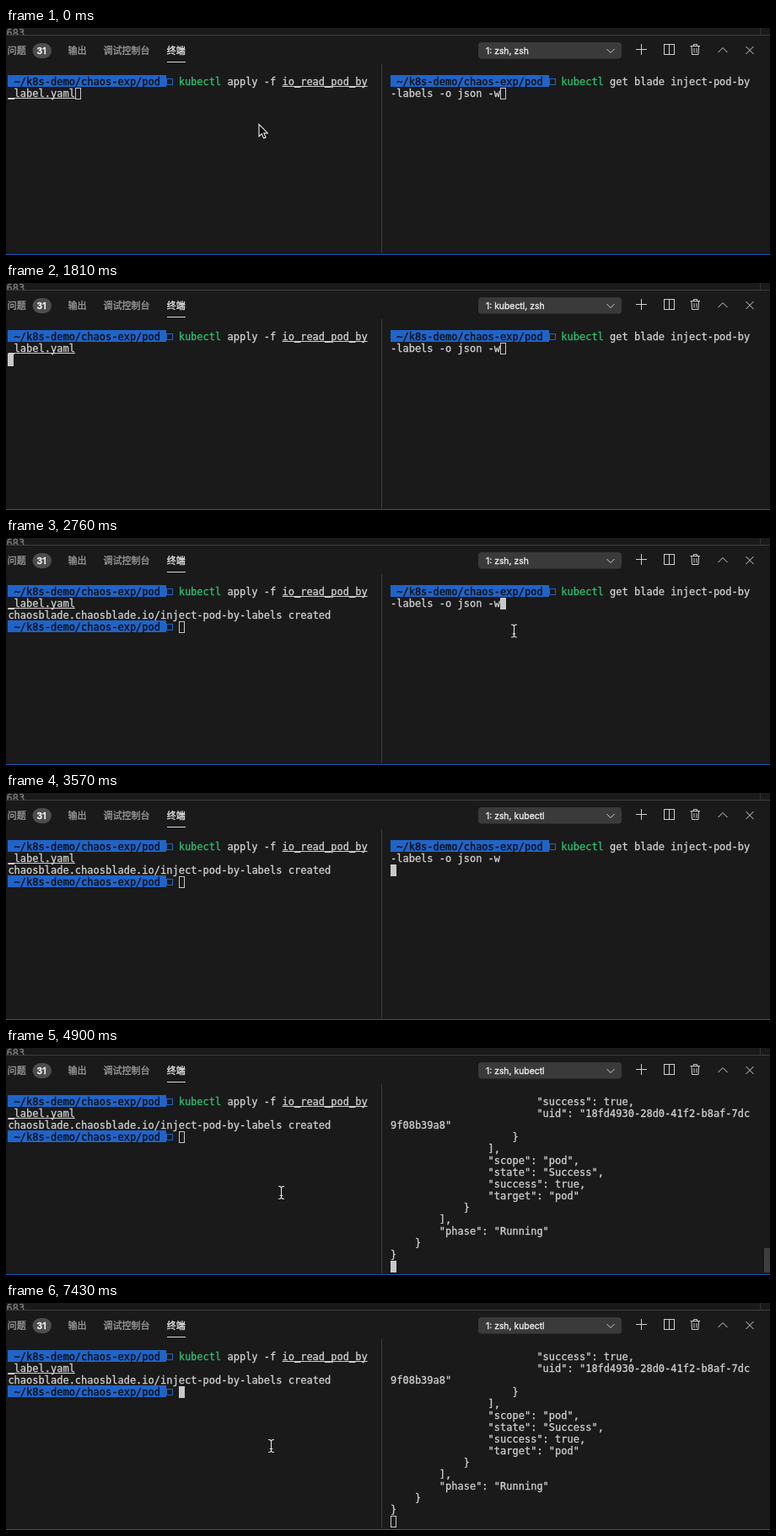
Write an HTML page with a canvas that moves like this. It is 906x270 px and loops after 8 s.

```html
<!DOCTYPE html>
<html lang="zh">
<head>
<meta charset="utf-8">
<title>Terminal</title>
<style>
  html, body { margin: 0; width: 100%; height: 100%; overflow: hidden; background: #1a1a1a; }
  canvas { display: block; width: 906px; height: 270px; }
</style>
</head>
<body>
<canvas id="stage" width="906" height="270"></canvas>
<script>
const ctx = document.getElementById('stage').getContext('2d');
const LOOP = 8000;
const MONO = '12px "DejaVu Sans Mono", monospace';
const CJK = '11px "Noto Sans CJK SC", "Noto Sans CJK", sans-serif';
const UI = '10.4px Inter, sans-serif';
const FG = '#d0d0d0', BLUE = '#2064c8', GREEN = '#2fbf71', BG = '#1a1a1a';
const CELL = 7.224, ROW = 14, TOP = 57;
const LEFT = 2.4, RIGHT = 456;

// Moments of the session, in ms
const T = {
  focusLeft: 50, enterLeft: 1300, titleLeft: 1520, created: 1860, prompt: 1910, titleIdle: 2110,
  moveRight: 2290, focusRight: 2700, enterRight: 3250, titleRight: 3500, json: 4000,
  moveLeft: 4430, barFade: 5000, refocusLeft: 5150, barGone: 5800
};

const JSON_TAIL = [
  [24, '"success": true,'],
  [24, '"uid": "18fd4930-28d0-41f2-b8af-7dc'],
  [0, '9f08b39a8"'],
  [20, '}'],
  [16, '],'],
  [16, '"scope": "pod",'],
  [16, '"state": "Success",'],
  [16, '"success": true,'],
  [16, '"target": "pod"'],
  [12, '}'],
  [8, '],'],
  [8, '"phase": "Running"'],
  [4, '}'],
  [0, '}']
];

function rect(x, y, w, h, color) {
  ctx.fillStyle = color;
  ctx.fillRect(x, y, w, h);
}

function pill(x, y, w, h, r, color) {
  ctx.fillStyle = color;
  ctx.beginPath();
  ctx.roundRect(x, y, w, h, r);
  ctx.fill();
}

// Text with a hairline stroke for a slightly heavier weight
function label(str, x, y, font, color) {
  ctx.font = font;
  ctx.fillStyle = ctx.strokeStyle = color;
  ctx.lineWidth = 0.3;
  ctx.fillText(str, x, y);
  ctx.strokeText(str, x, y);
}

function line(points, color = FG, width = 1) {
  ctx.strokeStyle = color;
  ctx.lineWidth = width;
  ctx.beginPath();
  points.forEach(([x, y], i) => i ? ctx.lineTo(x, y) : ctx.moveTo(x, y));
  ctx.stroke();
}

function box(x, y, w, h, color = FG) {
  ctx.strokeStyle = color;
  ctx.lineWidth = 1;
  ctx.strokeRect(x, y, w, h);
}

// Terminal text at a column and row of a pane
function put(pane, col, row, str, color = FG, underline = false) {
  const x = pane + col * CELL, y = TOP + row * ROW;
  label(str, x, y + 11, MONO, color);
  if (underline) rect(x, y + 12, str.length * CELL, 1, color);
}

function prompt(pane, row) {
  const x = Math.round(pane), y = TOP + row * ROW;
  rect(x, y - 1, Math.round(26 * CELL), ROW, BLUE);
  put(pane, 0, row, ' ~/k8s-demo/chaos-exp/pod ', '#0c0c0c');
  box(Math.round(pane + 26 * CELL) + 0.5, y + 3.5, 7, 7, BLUE);
}

function caret(pane, col, row, focused) {
  const x = Math.round(pane + col * CELL), y = TOP + row * ROW;
  if (focused) rect(x, y, 7, ROW, '#c8c8c8');
  else box(x + 0.5, y + 0.5, 6, ROW - 1, '#c8c8c8');
}

function toolbar(title) {
  label('683', 0.5, 10, MONO, '#7d7d7d');
  rect(0, 8, 906, 10, BG);
  rect(0, 8, 906, 1, '#3d3d3d');
  rect(894, 0, 1, 8, '#333333');

  label('问题', 1.7, 31, CJK, '#9a9a9a');
  pill(31.5, 18, 22.5, 18, 9, '#4d4d4d');
  label('31', 36.5, 31, '600 10.5px Inter, sans-serif', '#f5f5f5');
  label('输出', 73.5, 31, CJK, '#9a9a9a');
  label('调试控制台', 115.6, 31, CJK, '#9a9a9a');
  label('终端', 190.7, 31, CJK, '#e8e8e8');
  rect(191, 40, 22, 1, '#d8d8d8');

  pill(560, 17, 170, 19.5, 4, '#3a3a3a');
  label(title, 569, 31, UI, '#f0f0f0');
  line([[712.5, 25], [717, 29.5], [721.5, 25]]);

  line([[747, 25.5], [760, 25.5]]);
  line([[753.5, 19], [753.5, 32]]);
  box(780.5, 19.5, 12, 12);
  line([[786.5, 20], [786.5, 32]]);
  line([[811.5, 21.5], [823, 21.5]]);
  line([[815.5, 21], [815.5, 19.5], [819.5, 19.5], [819.5, 21]]);
  line([[813, 22], [813.5, 31.5], [821, 31.5], [821.5, 22]]);
  line([[816, 24], [816, 29.5]], FG, 0.9);
  line([[819, 24], [819, 29.5]], FG, 0.9);
  line([[844.5, 29], [850, 23.5], [855.5, 29]]);
  line([[877.5, 22], [886.5, 31]]);
  line([[886.5, 22], [877.5, 31]]);
}

function leftPane(t) {
  prompt(LEFT, 0);
  put(LEFT, 28, 0, 'kubectl', GREEN);
  put(LEFT, 36, 0, 'apply -f');
  put(LEFT, 45, 0, 'io_read_pod_by', FG, true);
  put(LEFT, 0, 1, '_label.yaml', FG, true);
  if (t >= T.created) put(LEFT, 0, 2, 'chaosblade.chaosblade.io/inject-pod-by-labels created');

  const focused = (t >= T.focusLeft && t < T.focusRight) || t >= T.refocusLeft;
  if (t < T.enterLeft) caret(LEFT, 11, 1, focused);
  else if (t < T.created) caret(LEFT, 0, 2, focused);
  else if (t < T.prompt) caret(LEFT, 0, 3, focused);
  else {
    prompt(LEFT, 3);
    caret(LEFT, 28, 3, focused);
  }
}

function scrollbar(t) {
  ctx.globalAlpha = 1 - ease(t, T.barFade, T.barGone);
  rect(899, 238, 7, 29, '#3e3e3e');
  ctx.globalAlpha = 1;
}

function rightPane(t) {
  const focused = t >= T.focusRight && t < T.refocusLeft;
  if (t >= T.json) {
    JSON_TAIL.forEach(([col, str], row) => put(RIGHT, col, row, str));
    caret(RIGHT, 0, JSON_TAIL.length, focused);
    scrollbar(t);
    return;
  }
  prompt(RIGHT, 0);
  put(RIGHT, 28, 0, 'kubectl', GREEN);
  put(RIGHT, 36, 0, 'get blade inject-pod-by');
  put(RIGHT, 0, 1, '-labels -o json -w');
  if (t < T.enterRight) caret(RIGHT, 18, 1, focused);
  else caret(RIGHT, 0, 2, focused);
}

function arrow(x, y) {
  ctx.beginPath();
  [[0, 0], [0, 14.5], [3.3, 11.4], [5.6, 16.6], [8, 15.6], [5.8, 10.6], [10.2, 10.4]]
    .forEach(([dx, dy]) => ctx.lineTo(x + dx, y + dy));
  ctx.closePath();
  ctx.fillStyle = '#050505';
  ctx.fill();
  ctx.strokeStyle = '#f2f2f2';
  ctx.lineWidth = 1.1;
  ctx.stroke();
}

function beam(x, y) {
  const c = '#e6e6e6';
  line([[x, y - 6], [x, y + 6]], c, 1.1);
  for (const s of [-1, 1]) {
    line([[x - 3.5, y + 7.5 * s], [x - 1.2, y + 7.2 * s], [x, y + 5.8 * s],
          [x + 1.2, y + 7.2 * s], [x + 3.5, y + 7.5 * s]], c, 1.1);
  }
  line([[x - 1.8, y + 3.5], [x + 1.8, y + 3.5]], c, 1);
}

// Eased progress from 0 to 1 between two moments
function ease(t, from, to) {
  const p = Math.min(1, Math.max(0, (t - from) / (to - from)));
  return p * p * (3 - 2 * p);
}

const mix = (a, b, p) => a + (b - a) * p;

// The pointer hides after a key press until it moves again
function pointer(t) {
  if (t < T.focusLeft) arrow(300, 114.5);
  else if (t < T.enterLeft) beam(300.5, 115);
  else if (t >= T.moveRight && t < T.enterRight) {
    const p = ease(t, T.moveRight, 2740);
    beam(mix(300.5, 602.5, p), mix(115, 110.5, p) + 4 * Math.sin(Math.PI * p));
  } else if (t >= T.moveLeft) {
    const p = ease(t, T.moveLeft, 4900), q = ease(t, 4900, 5120);
    beam(mix(602.5, 326.5, p) - 12 * q, mix(110.5, 172, p) - 2 * q);
  }
}

function title(t) {
  if (t >= T.titleRight) return '1: zsh, kubectl';
  return t >= T.titleLeft && t < T.titleIdle ? '1: kubectl, zsh' : '1: zsh, zsh';
}

function draw(t) {
  rect(0, 0, 906, 270, BG);
  toolbar(title(t));
  rect(445, 43, 1, 225, '#3d3d3d');
  leftPane(t);
  rightPane(t);
  rect(0, 269, 906, 1, '#1f56b4');
  pointer(t);
}

const start = performance.now();
function tick() {
  draw((performance.now() - start) % LOOP);
  requestAnimationFrame(tick);
}
tick();
</script>
</body>
</html>
```
